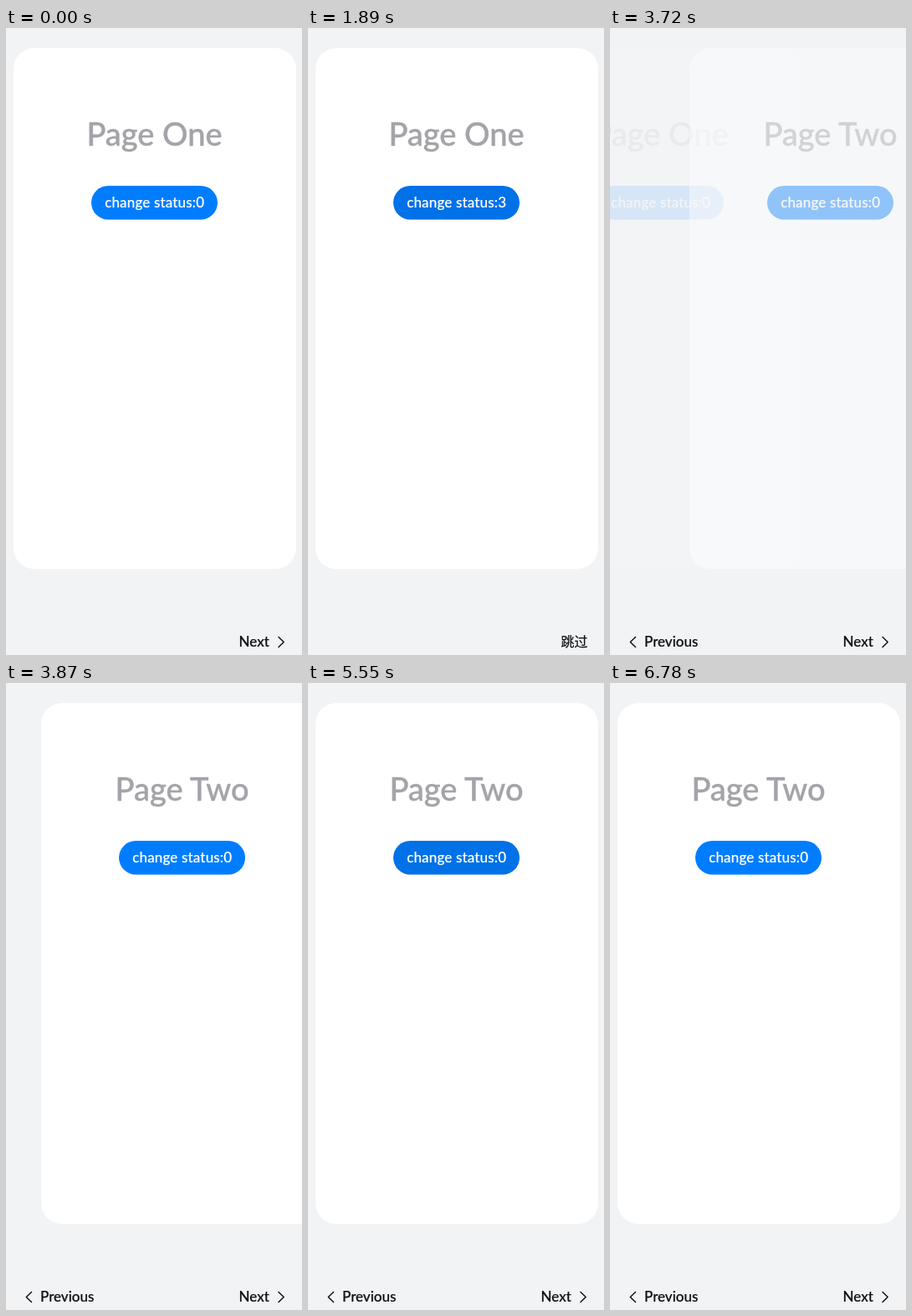
An HTML page that plays this animation: 354x751 px, repeating every 8000 ms.

```html
<!DOCTYPE html>
<html lang="en">
<head>
<meta charset="utf-8">
<title>Stepper</title>
<style>
  html, body { margin: 0; height: 100%; overflow: hidden; background: #f1f3f5; }
  svg { display: block; width: 354px; height: 751px; font: 500 17px Lato, "Noto Sans CJK SC", "Noto Sans CJK", sans-serif; }
  .title { font-size: 38px; fill: #a3a3a9; stroke: #a3a3a9; stroke-width: .4; }
  .label { fill: #fff; stroke: #fff; stroke-width: .2; letter-spacing: .15px; }
  .nav { fill: #111; stroke: #111; stroke-width: .2; }
  .skip { font: 500 16px "Noto Sans CJK SC", "Noto Sans CJK", sans-serif; }
  .arrow { fill: none; stroke: #111; stroke-width: 1.5; stroke-linecap: round; stroke-linejoin: round; }
</style>
</head>
<body>
<svg viewBox="0 0 354 751">
  <g id="pages"></g>
  <rect id="press" x="271" y="715" width="72" height="44" rx="8" fill="#d9dbdd"/>
  <g id="prev">
    <path class="arrow" d="M30.5 729.5L24.3 735.5L30.5 741.5"/>
    <text class="nav" x="41" y="741">Previous</text>
  </g>
  <g id="next">
    <text class="nav" x="278.5" y="741">Next</text>
    <path class="arrow" d="M326 729.5L332.2 735.5L326 741.5"/>
  </g>
  <text id="skip" class="nav skip" x="302.5" y="741">跳过</text>
</svg>
<script>
const LOOP = 8000, SLIDE_START = 3540, SLIDE_TIME = 570, SHIFT = 203, STEP = 60;
const taps = [[1020, 1170], [1890, 2100], [5550, 5700], [6570, 6720]];
const byId = id => document.getElementById(id);
const clamp = v => Math.min(1, Math.max(0, v));
const show = (id, on) => byId(id).setAttribute("visibility", on ? "visible" : "hidden");

const pages = ["One", "Two"].map(name => {
  const g = document.createElementNS("http://www.w3.org/2000/svg", "g");
  g.innerHTML = `<rect x="9" y="24" width="338" height="624" rx="25" fill="#fff"/>
    <text class="title" x="177.5" y="141" text-anchor="middle">Page ${name}</text>
    <rect class="button" x="102" y="189" width="151" height="40.5" rx="20.25"/>
    <text class="label" x="177.7" y="215" text-anchor="middle"></text>`;
  byId("pages").append(g);
  return g;
});

// cubic-bezier(.2, 0, .2, 1)
function ease(x) {
  let lo = 0, hi = 1;
  for (let i = 0; i < 20; i++) {
    const s = (lo + hi) / 2;
    if (.6 * s * (1 - s) + s ** 3 < x) lo = s; else hi = s;
  }
  return lo * lo * (3 - 2 * lo);
}

function place(page, x, opacity) {
  page.setAttribute("transform", `translate(${x})`);
  page.setAttribute("opacity", opacity);
}

function draw(t) {
  const pressed = taps.some(([down, up]) => t >= down && t < up);
  const skipping = taps.filter(([, up]) => t >= up).length % 2 === 1;
  const moved = t >= SLIDE_START;

  // the slide advances in short steps
  const run = Math.floor((t - SLIDE_START) / STEP) * STEP;
  const p = ease(clamp(run / SLIDE_TIME));
  place(pages[0], -SHIFT * p, 1 - clamp(run / 200));
  place(pages[1], SHIFT * (1 - p), clamp((run - 100) / 200));

  for (const page of pages) {
    page.querySelector(".button").setAttribute("fill", pressed ? "#0071e7" : "#007dff");
    page.querySelector(".label").textContent = "change status:" + (skipping ? 3 : 0);
  }
  show("press", t >= 3390 && !moved);
  show("prev", moved);
  show("next", !skipping);
  show("skip", skipping);
}

const start = performance.now();
function frame() {
  draw((performance.now() - start) % LOOP);
  requestAnimationFrame(frame);
}
frame();
</script>
</body>
</html>
```
